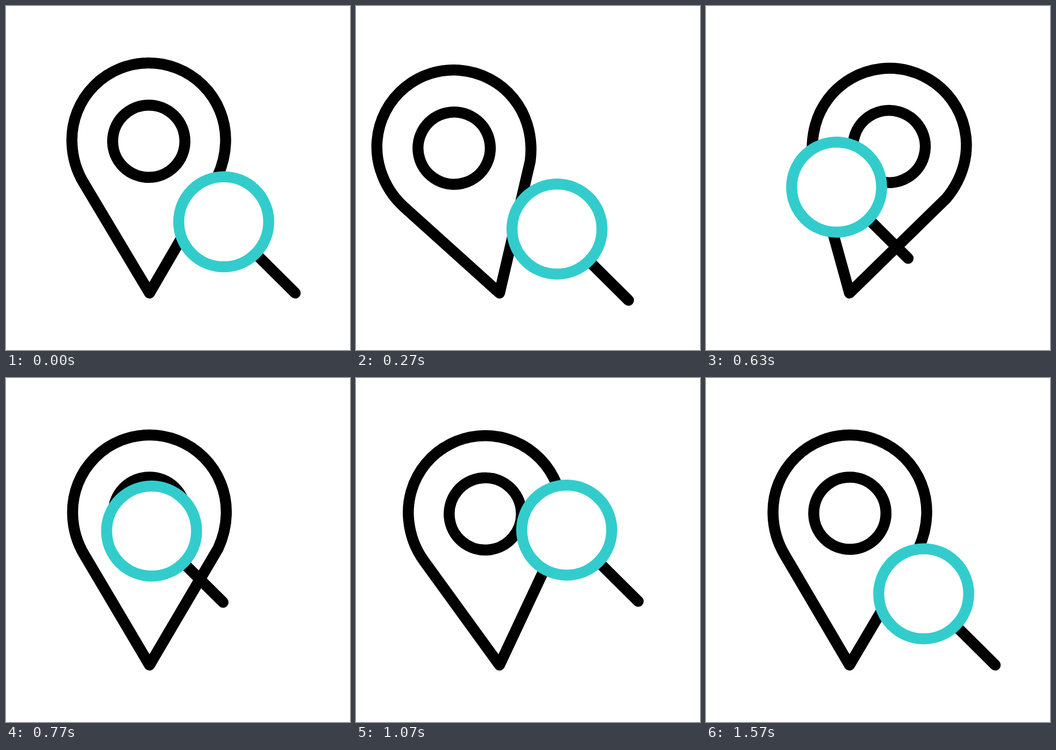
An HTML page for the animation above (1.67 s loop, 640 px wide and 640 px high).

```html
<!DOCTYPE html>
<html lang="en">
<head>
<meta charset="utf-8">
<title>Map pin search</title>
<style>
  html, body { margin: 0; height: 100%; overflow: hidden; background: #fff; }
  svg { display: block; width: 100vw; height: 100vh; }
</style>
</head>
<body>
<svg viewBox="0 0 640 640" fill="none" stroke="#000" stroke-width="20.5" stroke-linecap="round" stroke-linejoin="round">
  <g id="pin">
    <path d="M267 534 145.8 329C132 306 124 278 124 249A143 143 0 0 1 410 249C410 273 404.5 296 394.8 317Z"/>
    <circle cx="267" cy="251.6" r="67.2"/>
  </g>
  <g id="lens">
    <path d="M58 58 133 132.5"/>
    <circle r="83.7" fill="#fff" stroke="#3cc"/>
  </g>
</svg>
<script>
const LOOP = 1670, FPS = 30, LAST = 47;
const pin = document.getElementById('pin');
const lens = document.getElementById('lens');

// Damped swing: [frame, degrees] at each turning point
const swing = [[-0.7, 0], [7.5, -17.6], [17, 17.2], [28, -9.5], [40, 5.7], [48, 0]];

// Orbit on an ellipse: [frame, degrees, radius factor]
const orbit = [
  [0, 42.2, 1.088], [8, 62.9, 1.011], [13, 110.7, 1.022], [19, 184.3, 0.997],
  [26, 256.2, 1.004], [32, 311.4, 1], [38, 370.7, 1.01], [47, 402.2, 1.088]
];

const segment = (keys, f) => {
  let i = 0;
  while (i < keys.length - 2 && f >= keys[i + 1][0]) i++;
  return i;
};

// cubic-bezier(.4, 0, .5, 1)
function ease(x) {
  let lo = 0, hi = 1;
  for (let i = 0; i < 24; i++) {
    const t = (lo + hi) / 2, r = 1 - t;
    if (1.2 * r * r * t + 1.5 * r * t * t + t * t * t < x) lo = t; else hi = t;
  }
  return lo * lo * (3 - 2 * lo);
}

function swingAt(f) {
  const i = segment(swing, f), [t0, a] = swing[i], [t1, b] = swing[i + 1];
  return a + (b - a) * ease((f - t0) / (t1 - t0));
}

// Slope of a smooth curve through the keys, at rest on both ends
function slope(keys, i, col) {
  if (!i || i === keys.length - 1) return 0;
  const [p, q, r] = keys.slice(i - 1, i + 2);
  const h0 = q[0] - p[0], h1 = r[0] - q[0];
  return ((q[col] - p[col]) / h0 * h1 + (r[col] - q[col]) / h1 * h0) / (h0 + h1);
}

function spline(keys, f, col) {
  const i = segment(keys, f), a = keys[i], b = keys[i + 1];
  const h = b[0] - a[0], u = (f - a[0]) / h, v = 1 - u;
  return a[col] * v * v * (1 + 2 * u) + b[col] * u * u * (3 - 2 * u)
    + h * u * v * (v * slope(keys, i, col) - u * slope(keys, i + 1, col));
}

function draw(ms) {
  const tick = Math.floor(ms % LOOP / 10) * 10;
  const f = Math.min(LAST, Math.floor((tick + 3.4) * FPS / 1000));
  const angle = spline(orbit, f, 1) * Math.PI / 180, k = spline(orbit, f, 2);
  const x = 332.5 + 90 * k * Math.cos(angle), y = 343 + 80 * k * Math.sin(angle);
  pin.setAttribute('transform', `rotate(${swingAt(f)} 267 534)`);
  lens.setAttribute('transform', `translate(${x} ${y})`);
}

const start = performance.now();
function loop() {
  draw(performance.now() - start);
  requestAnimationFrame(loop);
}
loop();
</script>
</body>
</html>
```
